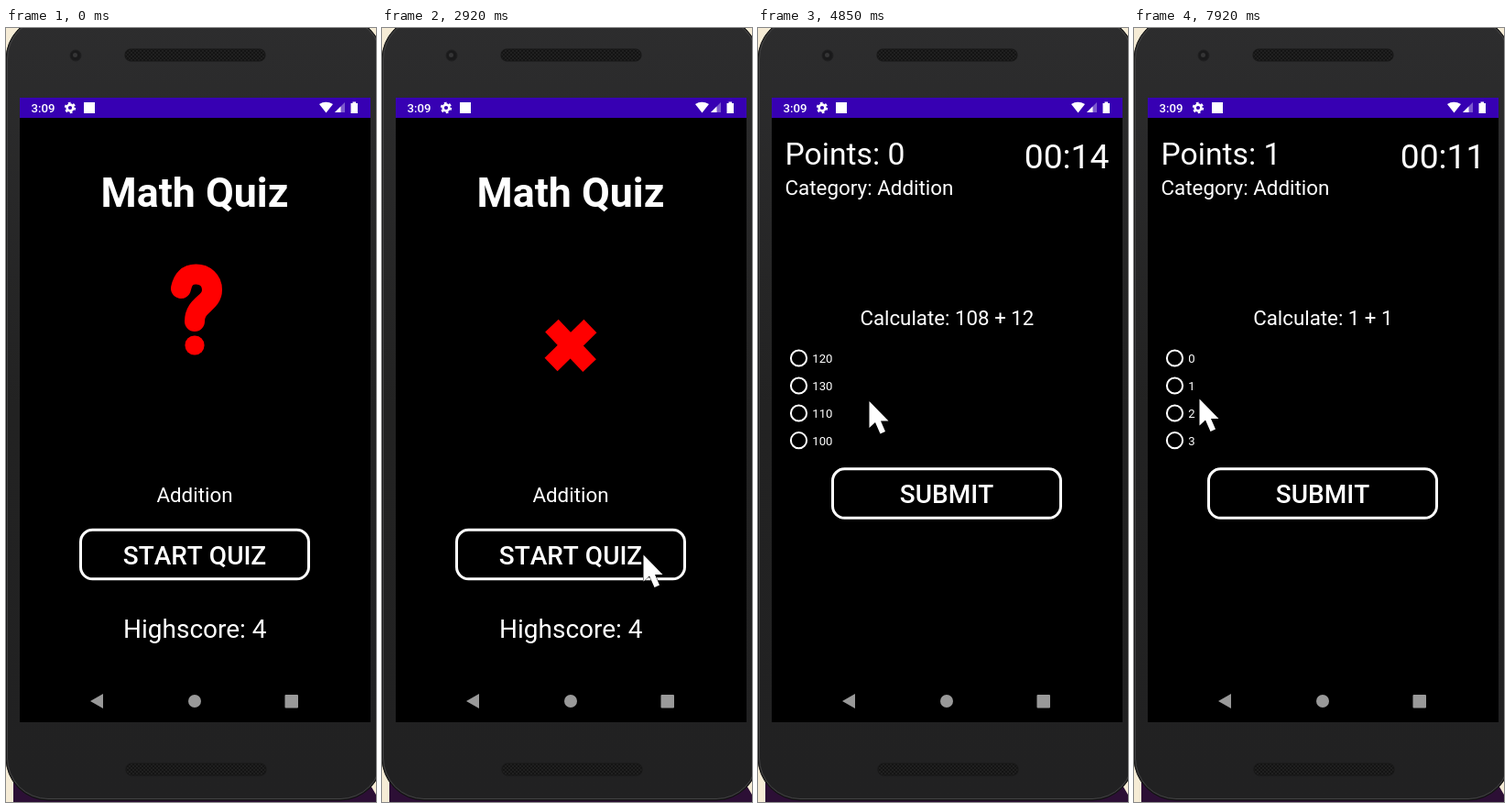
Recreate the animation shown at these times as an HTML page. Size 404x844 px, loop 8 s.

```html
<!DOCTYPE html>
<html lang="en">
<head>
<meta charset="utf-8">
<title>Math Quiz</title>
<style>
  html, body { margin: 0; width: 100%; height: 100%; overflow: hidden; background: #000; }
  svg { display: block; width: 404px; height: 844px; font-family: Roboto, Arial, sans-serif; }
  text { fill: #fff; white-space: pre; }
  .mid { text-anchor: middle; }
  .line { fill: none; stroke: #fff; }
  .button { font-size: 28px; font-weight: 500; font-kerning: none; text-anchor: middle; }
</style>
</head>
<body>
<svg viewBox="0 0 404 844" xmlns="http://www.w3.org/2000/svg">
  <defs>
    <linearGradient id="body" x1="0" y1="0" x2="0" y2="1">
      <stop offset="0" stop-color="#2d2d2e"/>
      <stop offset=".5" stop-color="#222"/>
      <stop offset="1" stop-color="#212122"/>
    </linearGradient>
    <pattern id="mesh" width="4" height="4" patternUnits="userSpaceOnUse">
      <rect width="4" height="4" fill="#202020"/>
      <circle cx="1" cy="1" r="1" fill="#101010"/>
      <circle cx="3" cy="3" r="1" fill="#101010"/>
    </pattern>
    <clipPath id="reveal"><rect id="revealBox" x="15" y="76" width="383" height="681"/></clipPath>
    <g id="status">
      <rect x="15" y="76" width="383" height="22" fill="#3700b3"/>
      <text x="27.5" y="92" font-size="13.2" font-weight="500">3:09</text>
      <g fill="none" stroke="#fff">
        <circle cx="70" cy="87" r="3.4" stroke-width="2.6"/>
        <circle cx="70" cy="87" r="5.2" stroke-width="2" stroke-dasharray="2.7 2.745"/>
      </g>
      <rect x="85" y="81" width="12" height="12" fill="#fff"/>
      <path d="M342 83Q349 78.5 357 83L349.5 92.5Z" fill="#fff"/>
      <path d="M370 81V92H359Z" fill="#fff" opacity=".35"/>
      <path d="M365.5 85.5V92H359Z" fill="#fff"/>
      <path d="M376.5 82H378.5V80.5H382V82H384V93H376.5Z" fill="#fff"/>
    </g>
  </defs>

  <rect width="404" height="844" fill="#f6ecd6"/>
  <path d="M8 822L20 812H390L404 836V844H8Z" fill="#2c0f35"/>
  <rect x="0" y="-12" width="411" height="854" rx="46" fill="url(#body)" stroke="#111"/>
  <rect x="1.5" y="-10.5" width="408" height="851" rx="44.5" fill="none" stroke="#414142"/>
  <rect x="130" y="23" width="153" height="13" rx="6" fill="url(#mesh)" stroke="#171717"/>
  <rect x="131" y="802" width="153" height="13" rx="6" fill="url(#mesh)" stroke="#171717"/>
  <circle cx="76" cy="30" r="6" fill="#1a1a1b" stroke="#202021"/>
  <circle cx="75.5" cy="29.5" r="2.5" fill="#353536"/>
  <rect x="15" y="76" width="383" height="681" fill="#000"/>

  <g id="home">
    <use href="#status"/>
    <g id="homeBody">
      <rect x="15" y="98" width="383" height="650"/>
      <text class="mid" x="206" y="195" font-size="44.7" font-weight="700">Math Quiz</text>
      <g fill="#f00">
        <path id="hook" d="M191 284C193 274 198 268.5 207.500 268.5C217 268.5 225 275 225 285.500C225 301 206 301 206 320"
              pathLength="100" fill="none" stroke="#f00" stroke-width="22" stroke-linecap="round"/>
        <rect id="barA"/>
        <rect id="barB"/>
      </g>
      <text class="mid" x="206" y="517" font-size="22.4">Addition</text>
      <rect class="line" x="81.5" y="547.3" width="249" height="53.5" rx="13" stroke-width="3"/>
      <text class="button" x="206" y="585">START QUIZ</text>
      <text class="mid" x="206.3" y="665" font-size="28">Highscore: 4</text>
    </g>
  </g>

  <g id="quiz" clip-path="url(#reveal)">
    <rect x="15" y="76" width="383" height="681" fill="#000"/>
    <use href="#status"/>
    <g id="quizBody">
      <text id="points" x="29.5" y="149" font-size="33.7"></text>
      <text id="timer" x="290.8" y="153" font-size="37.2"></text>
      <text x="29.5" y="181.5" font-size="22.4">Category: Addition</text>
      <text id="question" class="mid" x="206.4" y="324" font-size="22.3"></text>
      <g id="options"></g>
      <rect class="line" x="81.5" y="480.8" width="249" height="53.5" rx="13" stroke-width="3"/>
      <text class="button" x="206" y="518">SUBMIT</text>
    </g>
  </g>

  <g fill="#999">
    <path d="M92 734L106 726V742Z"/>
    <circle cx="206" cy="734" r="7"/>
    <rect x="304.5" y="727" width="14.5" height="14.5" rx="1"/>
  </g>
  <g id="pointer">
    <circle id="press" r="18" fill="#ff0" opacity=".5"/>
    <path d="M0 0V29L6.500 23L12 35.500L17.500 33L12.500 21.500H21Z" fill="#fff" stroke="#000" paint-order="stroke"/>
  </g>
</svg>
<script>
const LOOP = 8000;
const $ = id => document.getElementById(id);
const set = (el, attrs) => { for (const k in attrs) el.setAttribute(k, attrs[k]); };
const show = (el, on) => { el.style.display = on ? '' : 'none'; };
const put = (el, text) => { if (el.textContent !== text) el.textContent = text; };
const mix = (a, b, p) => a + (b - a) * p;
const within = (t, a, b) => t >= a && t < b;

// cubic-bezier(.4, 0, .2, 1)
function ease(x) {
  if (x <= 0 || x >= 1) return x <= 0 ? 0 : 1;
  let lo = 0, hi = 1, s = 0.5;
  for (let i = 0; i < 22; i++) {
    s = (lo + hi) / 2;
    const at = 1.2 * (1 - s) ** 2 * s + 0.6 * (1 - s) * s * s + s ** 3;
    if (at < x) lo = s; else hi = s;
  }
  return 3 * (1 - s) * s * s + s ** 3;
}
const linear = (t, a, b) => Math.min(1, Math.max(0, (t - a) / (b - a)));
const step = (t, a, b) => ease(linear(t, a, b));

const svgNS = 'http://www.w3.org/2000/svg';
const options = [360, 390, 420, 449.7].map(y => {
  const add = (tag, attrs) => {
    const el = document.createElementNS(svgNS, tag);
    set(el, attrs);
    return $('options').appendChild(el);
  };
  add('circle', { class: 'line', cx: 44.5, cy: y, r: 8.6, 'stroke-width': 2 });
  return {
    dot: add('circle', { cx: 44.5, cy: y, r: 4.8, fill: '#fff' }),
    label: add('text', { x: 59.3, y: y + 5, 'font-size': 13.1 })
  };
});

// [time, x, y] of the pointer tip
const route = [
  [250, 368, 842], [620, 340, 690], [990, 303, 574], [1700, 285.5, 574.5],
  [4480, 285.5, 574.5], [4770, 150, 474], [4850, 121.5, 407], [5150, 121.5, 407],
  [5600, 83, 374], [5780, 62, 362], [6000, 62, 362], [6400, 153, 491],
  [7180, 153, 491], [7770, 87, 406], [7920, 71.5, 404.5]
];
const presses = [[4000, 4160], [5780, 5930], [6440, 6640], [7000, 7150]];

function drawPointer(t) {
  show($('pointer'), t >= route[0][0]);
  let i = route.findIndex(k => k[0] > t);
  if (i < 0) i = route.length;
  const a = route[Math.max(0, i - 1)], b = route[i] || a;
  const p = a === b ? 0 : linear(t, a[0], b[0]);
  set($('pointer'), { transform: `translate(${mix(a[1], b[1], p)} ${mix(a[2], b[2], p)})` });
  show($('press'), presses.some(([from, to]) => within(t, from, to)));
}

function drawBar(el, y, w, h, angle, round) {
  set(el, {
    x: 206 - w / 2, y: y - h / 2, width: w, height: h, rx: round,
    transform: `rotate(${angle} 206 ${y})`
  });
}

function drawSymbol(t) {
  const hook = $('hook');
  const gone = step(t, 230, 800);
  const drawn = linear(t, 4340, 4850);
  if (t < 4000) {
    const left = 100 * (1 - gone);
    set(hook, { 'stroke-dasharray': `${left} 300`, 'stroke-dashoffset': -100 * gone });
    show(hook, left > 0.2);
  } else {
    set(hook, { 'stroke-dasharray': `${100 * drawn} 300`, 'stroke-dashoffset': 0 });
    show(hook, drawn > 0);
  }

  const grow = step(t, 500, 1130);
  const cross = step(t, 1850, 2270);
  const equal = step(t, 2850, 3850);
  const shrink = step(t, 4000, 4340);
  const size = 1 - shrink;
  const round = t < 4000 ? 10 * (1 - grow) : 10 * shrink;
  const dot = 21 * linear(t, 4350, 4800);
  drawBar($('barA'), 346, dot || mix(21, 60, grow) * size, dot || mix(21, 20, grow) * size,
    135 * cross + 45 * equal, dot ? dot / 2 : round);
  drawBar($('barB'), 346 + 31 * equal * size, 60 * size, 20 * size, 45 * cross + 135 * equal, round);
  show($('barB'), within(t, 1850, 4340));
}

function drawQuiz(t) {
  const next = t >= 7160;
  const answers = next ? [0, 1, 2, 3] : [120, 130, 110, 100];
  const tick = t < 5300 ? 14 : t < 6300 ? 13 : t < 7300 ? 12 : 11;
  put($('points'), `Points: ${t < 6600 ? 0 : 1}`);
  put($('timer'), `00:${tick}`);
  put($('question'), `Calculate: ${next ? '1 + 1' : '108 + 12'}`);
  options.forEach(({ dot, label }, i) => {
    put(label, String(answers[i]));
    show(dot, i === 0 && within(t, 5900, 7160));
  });
}

function drawScreens(t) {
  const slide = step(t, 4325, 4750);
  const top = mix(757, 76, linear(t, 4311, 4511));
  show($('home'), t < 4520);
  show($('quiz'), t >= 4311);
  set($('home'), { opacity: 1 - 0.9 * linear(t, 4355, 4800) });
  set($('homeBody'), { transform: `translate(0 ${-22 * slide})` });
  set($('revealBox'), { y: top, height: 757 - top });
  set($('quizBody'), { transform: `translate(0 ${27 * (1 - slide)})` });
}

function render(t) {
  drawScreens(t);
  drawSymbol(t);
  drawQuiz(t);
  drawPointer(t);
}

const start = performance.now();
function frame() {
  render((performance.now() - start) % LOOP);
  requestAnimationFrame(frame);
}
frame();
</script>
</body>
</html>
```
